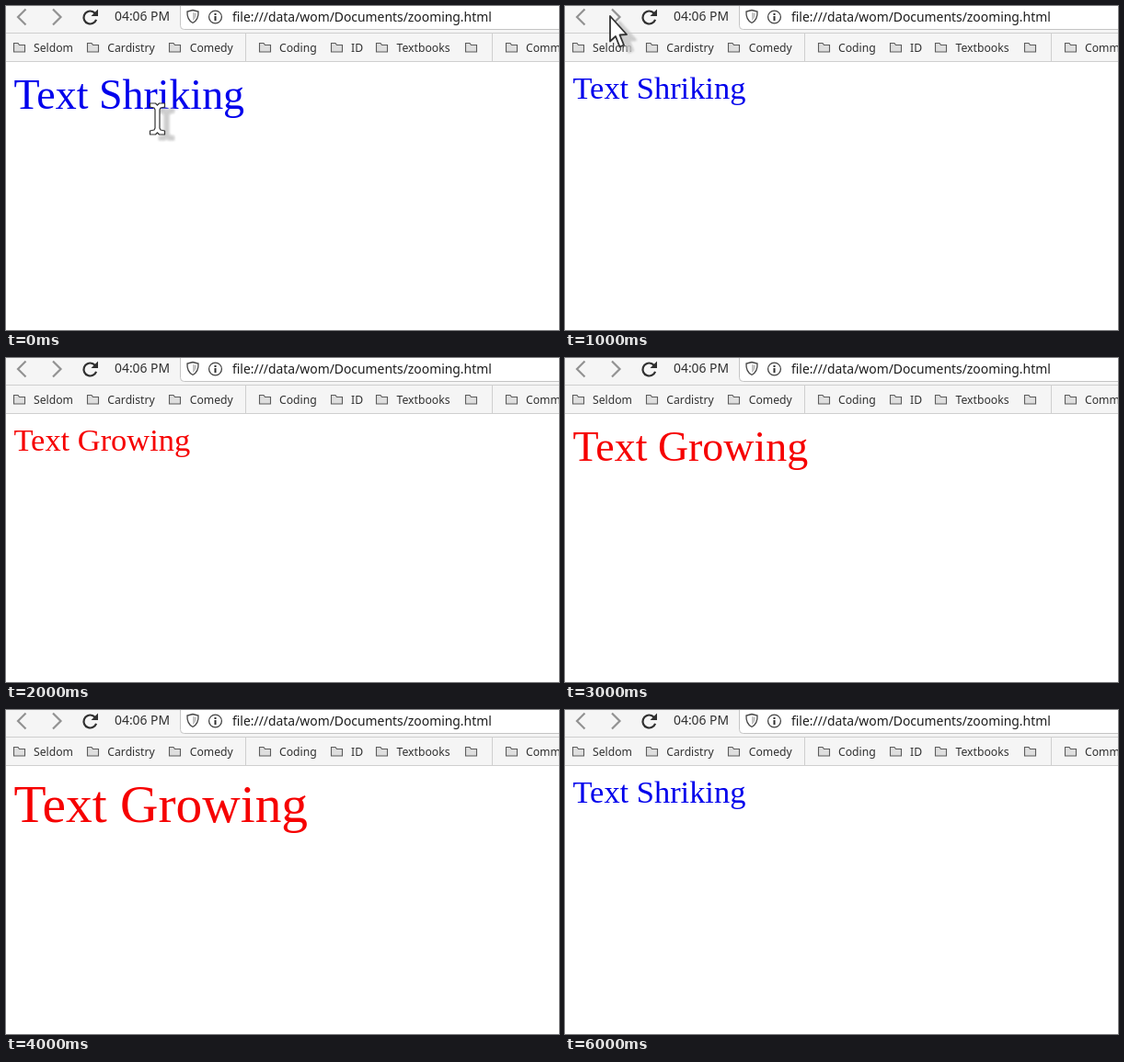
An HTML page with a canvas for the animation above (6.4 s loop, 601x353 px).

```html
<!DOCTYPE html>
<html lang="en">
<head>
<meta charset="utf-8">
<title>Growing and shrinking text</title>
<style>
  html, body { margin: 0; width: 100%; height: 100%; overflow: hidden; background: #fff; }
  canvas { display: block; }
</style>
</head>
<body>
<canvas id="stage" width="601" height="353"></canvas>
<script>
const ctx = document.getElementById('stage').getContext('2d');
const LOOP = 6400;
const UI = '"Noto Sans", "Open Sans", sans-serif';
const SERIF = '"Liberation Serif", serif';

const FOLDERS = [
  [8, 'Seldom'], [88.3, 'Cardistry'], [177.7, 'Comedy'], [275, 'Coding'],
  [353, 'ID'], [402.5, 'Textbooks'], [499, ''], [543, 'Comments']
];

function label(text, x, y, size, color, family = UI) {
  ctx.font = `${size}px ${family}`;
  ctx.fillStyle = color;
  ctx.fillText(text, x, y);
}

function trace(points, close) {
  ctx.beginPath();
  points.forEach(([x, y], i) => i ? ctx.lineTo(x, y) : ctx.moveTo(x, y));
  if (close) ctx.closePath();
}

function strokeLine(points, color, width, close = false) {
  trace(points, close);
  ctx.strokeStyle = color;
  ctx.lineWidth = width;
  ctx.stroke();
}

function chevron(x, dir) {
  strokeLine([[x, 3.5], [x + 8.5 * dir, 12], [x, 20.5]], '#929292', 2.2);
}

function reloadIcon() {
  ctx.beginPath();
  ctx.arc(91.5, 12.5, 7, 0.35, Math.PI * 1.77);
  ctx.strokeStyle = '#303030';
  ctx.lineWidth = 2.2;
  ctx.stroke();
  trace([[100, 3.5], [100, 11], [92.5, 11]], true);
  ctx.fillStyle = '#303030';
  ctx.fill();
}

function shieldIcon() {
  const half = side => {
    ctx.moveTo(203, 4.5);
    ctx.lineTo(203 + 6 * side, 6);
    ctx.bezierCurveTo(203 + 6.4 * side, 12, 203 + 4.5 * side, 16, 203, 18.5);
  };
  ctx.beginPath();
  half(-1);
  half(1);
  ctx.strokeStyle = '#454545';
  ctx.lineWidth = 1.3;
  ctx.stroke();
  ctx.beginPath();
  ctx.moveTo(203, 7);
  ctx.lineTo(207, 8);
  ctx.quadraticCurveTo(207, 13.5, 203, 16);
  ctx.fillStyle = '#c4c4c4';
  ctx.fill();
}

function infoIcon() {
  ctx.beginPath();
  ctx.arc(227.5, 12, 6.9, 0, Math.PI * 2);
  ctx.strokeStyle = '#454545';
  ctx.lineWidth = 1.3;
  ctx.stroke();
  ctx.fillStyle = '#303030';
  ctx.fillRect(226.5, 8, 2, 2);
  ctx.fillRect(226.5, 11, 2, 5);
}

function folder(x, name) {
  const left = Math.floor(x) + 0.5;
  const outline = [
    [left, 40.5], [left + 4.5, 40.5], [left + 6, 42.5],
    [left + 12, 42.5], [left + 12, 50], [left, 50]
  ];
  trace(outline, true);
  ctx.fillStyle = '#dedede';
  ctx.fill();
  strokeLine(outline, '#5c5c5c', 1.1, true);
  label(name, x + 22, 50, 12.2, '#303030');
}

function browser() {
  ctx.fillStyle = '#fff';
  ctx.fillRect(0, 0, 601, 353);
  ctx.fillStyle = '#f5f5f5';
  ctx.fillRect(0, 0, 601, 60);
  ctx.fillStyle = '#cfcfcf';
  ctx.fillRect(0, 29, 601, 1);
  ctx.fillRect(0, 60, 601, 1);
  ctx.fillRect(260, 30, 1, 30);
  ctx.fillRect(528, 30, 1, 30);

  ctx.beginPath();
  ctx.roundRect(189.5, -10, 430, 35.5, 4);
  ctx.fillStyle = '#fff';
  ctx.fill();
  ctx.strokeStyle = '#c4c4c4';
  ctx.lineWidth = 1;
  ctx.stroke();

  chevron(21.5, -1);
  chevron(51, 1);
  reloadIcon();
  shieldIcon();
  infoIcon();
  label('04:06 PM', 118, 16, 13.9, '#303030');
  label('file:///data/wom/Documents/zooming.html', 246, 17, 13.9, '#1c1c1c');
  FOLDERS.forEach(f => folder(...f));
}

// One size step every half second: down to 5, up to 10, down again.
function headline(t) {
  const n = Math.floor(t / 500);
  const growing = n >= 4 && n <= 8;
  const step = n < 4 ? 8 - n : growing ? n + 2 : 18 - n;
  const size = step * 5.74;
  label(growing ? 'Text Growing' : 'Text Shriking', 8.5,
    Math.round(70 + 0.912 * size), size, growing ? '#f60000' : '#0000ec', SERIF);
}

function pointer(points, x, y, dx, dy, width) {
  ctx.save();
  ctx.lineJoin = 'round';
  ctx.translate(x + dx, y + dy);
  ctx.filter = 'blur(1px)';
  trace(points, true);
  ctx.fillStyle = ctx.strokeStyle = '#c6c6c6';
  ctx.lineWidth = width;
  ctx.globalAlpha = 0.85;
  ctx.fill();
  ctx.stroke();
  ctx.globalAlpha = 1;
  ctx.filter = 'none';
  ctx.translate(-dx, -dy);
  trace(points, true);
  ctx.fillStyle = '#fff';
  ctx.fill();
  strokeLine(points, '#333', width, true);
  ctx.restore();
}

function arrow(x, y) {
  pointer([[1, 1], [1, 28.5], [7, 23], [11.5, 34.5], [16, 32.5],
    [11.5, 21.5], [19, 21]], x, y, 10, 6, 1.8);
}

function beam(x, y) {
  const quarter = [[0, -15], [2, -17], [8, -17], [8, -13], [3.5, -12], [2.5, -10]];
  const flip = (sx, sy) => quarter.map(([px, py]) => [px * sx, py * sy]);
  pointer([...flip(1, 1), ...flip(1, -1).reverse(),
    ...flip(-1, -1), ...flip(-1, 1).reverse()], x, y, 10, 6, 1.2);
}

function cursor(t) {
  const tick = Math.floor(t / 100);
  if (tick >= 18) return;
  if (tick >= 15) {
    const k = tick - 14;
    arrow(48 + 55 * k, 10 - 7 * k / 3);
    return;
  }
  const p = Math.min(Math.max(tick - 1, 0), 8) / 8;
  const x = 164.5 - 116.5 * p;
  const y = 123 - 113 * p;
  (y < 61 ? arrow : beam)(x, y);
}

const start = performance.now();

function draw() {
  const t = (performance.now() - start) % LOOP;
  browser();
  headline(t);
  cursor(t);
  requestAnimationFrame(draw);
}
draw();
</script>
</body>
</html>
```
